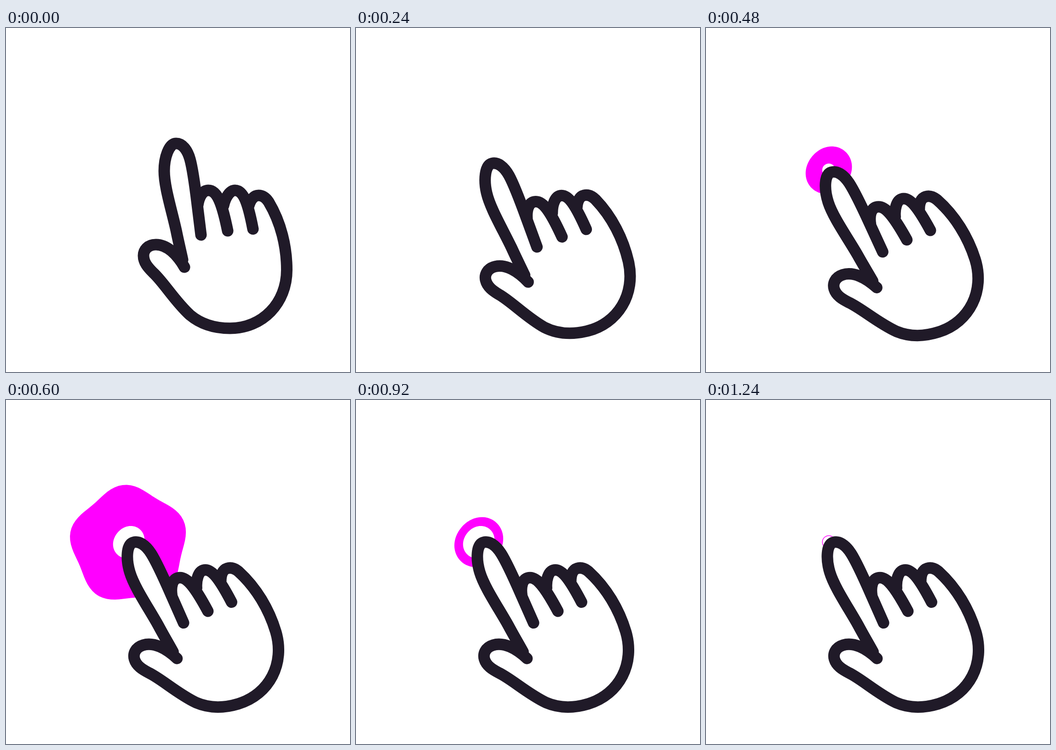
An HTML page that plays this animation: 748x748 px, repeating every 1.28 s.

```html
<!DOCTYPE html>
<html lang="en">
<head>
<meta charset="utf-8">
<title>Tapping hand</title>
<style>
  html, body { margin: 0; width: 100%; height: 100%; overflow: hidden; background: #fff; }
  svg { display: block; width: 100vw; height: 100vh; }
  .hand { fill: #fff; stroke: #201a28; stroke-width: 25; stroke-linecap: round; stroke-linejoin: round; }
</style>
</head>
<body>
<svg viewBox="0 0 748 748">
  <g id="ripple"></g>
  <path id="hand" class="hand" d="
    M388 520 C372 492 350 471 326 471 C308 471 299 483 299 495 C299 510 309 521 320 532
    C343 553 367 594 400 624 C425 645 455 653 487 653 C558 653 610.5 598 610.5 526
    C610.5 476 598 423 571 378 C565 369 557 364 549 364 C539 364 532 373 528 386
    M473 386 C477 368 487 353 498 353 C518 353 528 390 537 437
    M417 385 C420 366 428 353 440 353 C462 353 472 392 482 441
    M424 450 L416 385 C412 352 407 310 400 285 C394 264 383 251 370 251
    C354 251 344 282 344 311 C344 345 360 395 370 440 C375 465 380 485 384 504"/>
</svg>
<script>
const LOOP = 1280, STEP = 40;
const TURN_START = 120, TURN_END = 512, TURN = 16.8, OVERSHOOT = 0.25, PEAK_AFTER = 240;
const CONTACT = 400;
const RAD = Math.PI / 180;

// Discs from back to front; each swells to its size and sinks back to its rest size.
const discs = [
  { color: '#f0f', peak: 703, spread: 188, size: 161, rest: 14.6 },
  { color: '#fff', peak: 760, spread: 133, size: 103, rest: 13.2 },
  { color: '#f0f', peak: 760, spread: 60, size: 34, rest: 0 },
  { color: '#fff', peak: 760, spread: 60, size: 10, rest: 0 }
];

const hand = document.getElementById('hand');
const ripple = document.getElementById('ripple');
for (const disc of discs) {
  disc.path = document.createElementNS('http://www.w3.org/2000/svg', 'path');
  disc.path.setAttribute('fill', disc.color);
  ripple.append(disc.path);
}

const clamp = (v, lo, hi) => Math.min(hi, Math.max(lo, v));

// Underdamped spring that stops when it swings back to its goal.
function tilt(t) {
  const s = clamp(t, TURN_START, TURN_END) - TURN_START;
  const decay = -Math.log(OVERSHOOT) / PEAK_AFTER, speed = Math.PI / PEAK_AFTER;
  const swing = Math.cos(speed * s) + decay / speed * Math.sin(speed * s);
  return TURN * (1 - Math.exp(-decay * s) * swing);
}

const discSize = ({ peak, spread, size, rest }, t) =>
  rest + (size - rest) * Math.exp(-(((t - peak) / spread) ** 2));

// Round when tiny, then oval, then a soft pentagon.
function blobPath(size) {
  const oval = 0.07 * clamp((size - 14) / 20, 0, 1);
  const k = clamp((size - 54) / 50, 0, 1);
  const points = [];
  for (let a = 0; a < 360; a += 4) {
    const r = size * (1 + (1 - k) * oval * Math.cos(2 * (a - 130) * RAD)
                        + k * 0.055 * Math.cos(5 * (a + 23) * RAD));
    points.push([267 + r * Math.cos(a * RAD), 309 + 5 * k + r * Math.sin(a * RAD)]);
  }
  return `M${points.join('L')}Z`;
}

function draw() {
  const t = Math.floor(performance.now() % LOOP / STEP) * STEP;
  hand.setAttribute('transform', `rotate(${-tilt(t)} 522 596)`);
  ripple.setAttribute('visibility', t < CONTACT ? 'hidden' : 'visible');
  for (const disc of discs) disc.path.setAttribute('d', blobPath(discSize(disc, t)));
  requestAnimationFrame(draw);
}
draw();
</script>
</body>
</html>
```
